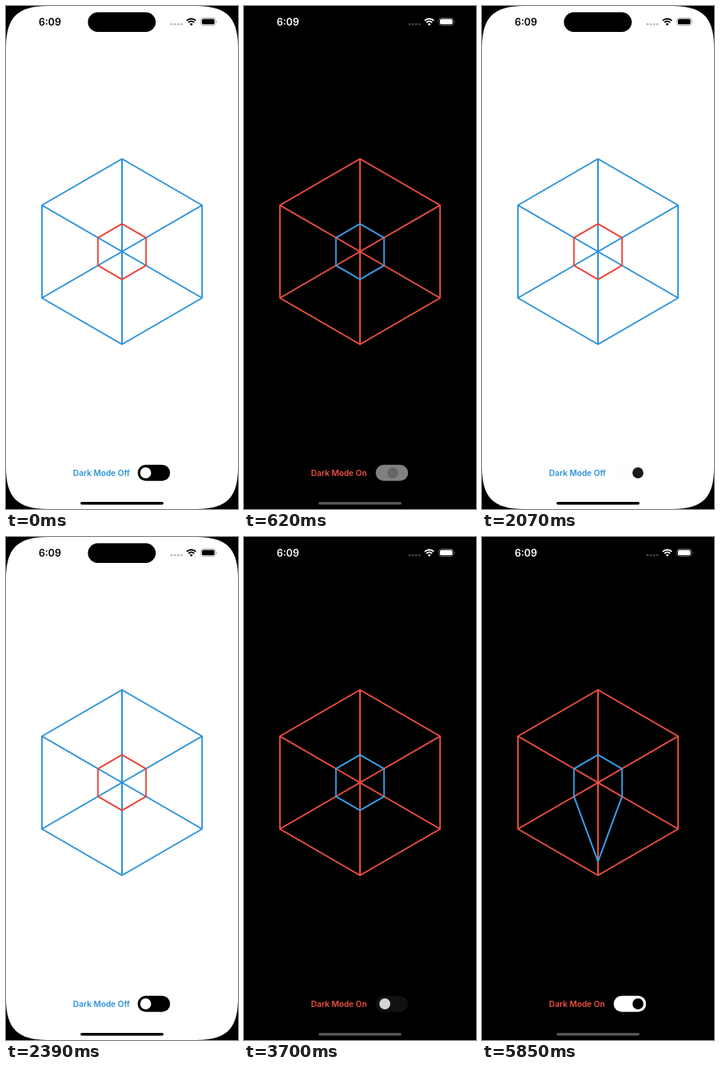
These frames come from a looping animation (296x640 px, 8 s). An HTML page:

```html
<!DOCTYPE html>
<html lang="en">
<head>
<meta charset="utf-8">
<title>Dark mode radar</title>
<style>
  html, body { margin: 0; width: 100%; height: 100%; overflow: hidden; background: #000; }
  svg { display: block; width: 100%; height: 100%; }
  text { font-family: Inter, Roboto, sans-serif; font-weight: 600; }
</style>
</head>
<body>
<svg viewBox="0 0 296 640">
  <rect width="296" height="640"/>
  <path id="screen" fill="#fff" d="M0 53C0 14.6 14.6 0 53 0H243C281.4 0 296 14.6 296 53V587C296 625.4 281.4 640 243 640H53C14.6 640 0 625.4 0 587Z"/>
  <rect x="104.5" y="8" width="86.5" height="25" rx="12.5"/>

  <g id="status">
    <text x="41.8" y="24.6" font-size="12.6">6:09</text>
    <g opacity=".27">
      <circle cx="211.2" cy="23.2" r="1.4"/>
      <circle cx="215.4" cy="23.2" r="1.4"/>
      <circle cx="219.6" cy="23.2" r="1.4"/>
      <circle cx="223.8" cy="23.2" r="1.4"/>
    </g>
    <g fill="none" stroke="currentColor" stroke-width="1.9">
      <path d="M230.6 18.6A8.2 8.2 0 0 1 242.2 18.6"/>
      <path d="M232.8 21A5.1 5.1 0 0 1 240 21"/>
    </g>
    <path d="M236.4 25L234.4 22.9A2.9 2.9 0 0 1 238.4 22.9Z"/>
    <rect x="248.7" y="15.2" width="18.6" height="9.4" rx="3" fill="none" stroke="currentColor" stroke-width=".9" opacity=".4"/>
    <path d="M268.4 18.4Q270 19.9 268.4 21.4Z" opacity=".45"/>
    <rect x="250" y="16.5" width="16" height="6.8" rx="1.9"/>
  </g>

  <g fill="none" stroke-width="2" stroke-linejoin="round">
    <path id="web"/>
    <path id="shape"/>
  </g>

  <text id="label" x="85.6" y="597.6" font-size="10.3"></text>
  <g id="toggle">
    <rect id="track" x="168" y="583.8" width="41.4" height="20.4" rx="10.2"/>
    <circle id="knob" cy="594" r="7"/>
  </g>
  <rect id="home" x="95" y="631" width="106" height="3.6" rx="1.8"/>
</svg>
<script>
const LOOP = 8000, CX = 148, CY = 312.5, R = 118;
const THEMES = [
  { ink: '#000', web: '#2b91d9', shape: '#e84338', home: '#000', text: 'Dark Mode Off' },
  { ink: '#fff', web: '#ef5041', shape: '#3a9ee6', home: '#555', text: 'Dark Mode On' }
];
// Each tap: the moment the theme flips, the new mode, and its screen updates.
const TAPS = [
  { flip: 510, dark: 1, steps: [500, 620, 730, 840, 950] },
  { flip: 2065, dark: 0, steps: [1950, 2070, 2180, 2290, 2390] },
  { flip: 3674, dark: 1, steps: [3590, 3700, 3800, 3910, 4030] }
];
const DRAG = { from: 5230, to: 5850, steps: [5290, 5410, 5540, 5730, 5850] };
const TICKS = [0, ...TAPS.flatMap(tap => tap.steps), ...DRAG.steps];

const el = id => document.getElementById(id);
const set = (id, attrs) => {
  for (const k in attrs) el(id).setAttribute(k, attrs[k]);
};
const gray = v => { const n = Math.round(255 * v); return `rgb(${n},${n},${n})`; };
const point = (i, v) => {
  const a = (i * 60 - 90) * Math.PI / 180;
  return `${(CX + R * v * Math.cos(a)).toFixed(2)} ${(CY + R * v * Math.sin(a)).toFixed(2)}`;
};
const polygon = values => 'M' + values.map((v, i) => point(i, v)).join('L') + 'Z';
const spring = ms => { const x = Math.max(0, ms) * 0.017; return 1 - (1 + x) * Math.exp(-x); };

function toggleState(t) {
  let state = { dark: 0, on: 0, opacity: 1 };
  for (const { flip, dark, steps } of TAPS) {
    if (t < steps[0]) break;
    const p = t >= steps[4] ? 1 : spring(t - flip);
    state = {
      dark: t >= flip ? dark : 1 - dark,
      on: dark ? p : 1 - p,
      opacity: 0.9 + 0.1 * p ** 4
    };
  }
  return state;
}

function draw(time) {
  const t = TICKS.findLast(tick => tick <= time);
  const { dark, on, opacity } = toggleState(t);
  const theme = THEMES[dark];
  const u = Math.min(1, Math.max(0, (t - DRAG.from) / (DRAG.to - DRAG.from)));
  const values = [0.3, 0.3, 0.3, 0.3 + 0.55 * Math.sin(u * Math.PI / 2), 0.3, 0.3];

  set('screen', { fill: dark ? '#000' : '#fff' });
  set('status', { fill: theme.ink, color: theme.ink });
  set('web', { stroke: theme.web });
  set('shape', { stroke: theme.shape, d: polygon(values) });
  set('label', { fill: theme.web });
  el('label').textContent = theme.text;
  set('toggle', { opacity });
  set('track', { fill: gray(on) });
  set('knob', { fill: gray(1 - on), cx: 178.2 + 20.8 * on });
  set('home', { fill: theme.home });
}

const spokes = [0, 1, 2].map(i => `M${point(i, 1)}L${point(i + 3, 1)}`).join('');
set('web', { d: polygon(Array(6).fill(1)) + spokes });

const start = performance.now();
function frame() {
  draw((performance.now() - start) % LOOP);
  requestAnimationFrame(frame);
}
frame();
</script>
</body>
</html>
```
